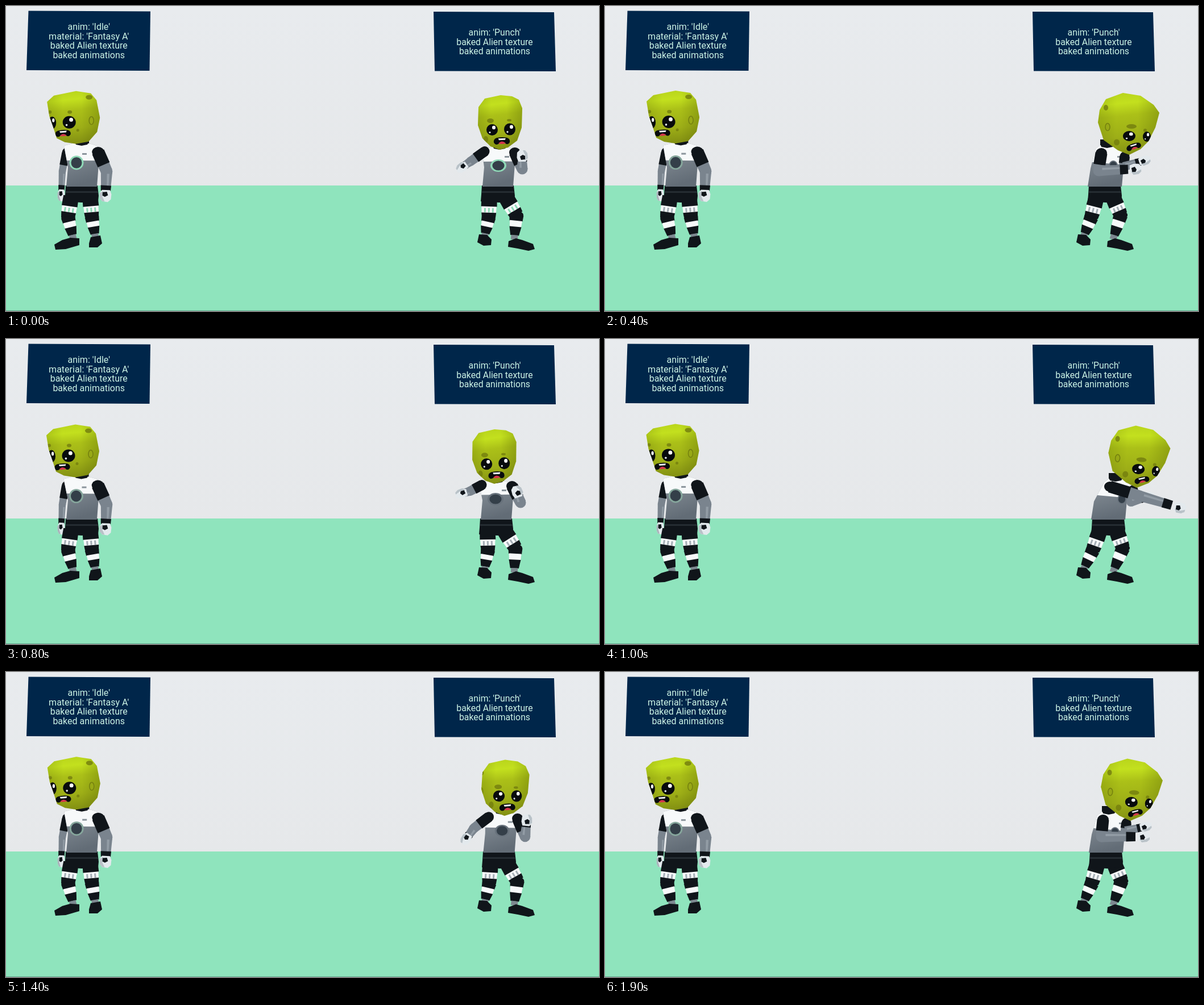
Recreate the animation shown at these times as an HTML page. Size 1043 px wide and 537 px high, loop 2000 ms.

```html
<!DOCTYPE html>
<html lang="en">
<head>
<meta charset="utf-8">
<title>Baked animations</title>
<style>
html, body { margin: 0; width: 100%; height: 100%; overflow: hidden; background: #e8ebee; }
svg { display: block; width: 1043px; height: 537px; }
text { font-family: Roboto, sans-serif; fill: #cdf3e6; text-anchor: middle; }
</style>
</head>
<body>
<svg viewBox="0 0 1043 537" xmlns="http://www.w3.org/2000/svg">
  <defs>
    <linearGradient id="skin" x1=".45" y1="0" x2=".55" y2="1">
      <stop offset="0" stop-color="#b9d51c"/>
      <stop offset=".16" stop-color="#c3e01e"/>
      <stop offset=".36" stop-color="#abc018"/>
      <stop offset=".7" stop-color="#9dae17"/>
      <stop offset="1" stop-color="#828f12"/>
    </linearGradient>
    <linearGradient id="shade">
      <stop offset="0" stop-color="#4d5a00" stop-opacity=".2"/>
      <stop offset=".3" stop-color="#4d5a00" stop-opacity="0"/>
      <stop offset=".65" stop-color="#4d5a00" stop-opacity="0"/>
      <stop offset="1" stop-color="#4d5a00" stop-opacity=".28"/>
    </linearGradient>
    <linearGradient id="shirt" x2=".25" y2="1">
      <stop offset="0" stop-color="#8d969e"/>
      <stop offset="1" stop-color="#626c76"/>
    </linearGradient>
    <linearGradient id="sky" x2="0" y2="1">
      <stop offset="0" stop-color="#e8ebee"/>
      <stop offset="1" stop-color="#e6e8ea"/>
    </linearGradient>
  </defs>
  <rect width="1043" height="317" fill="url(#sky)"/>
  <rect y="316" width="1043" height="221" fill="#8fe4bd"/>
  <rect y="536" width="1043" height="1" fill="#62a58b"/>
  <g fill="#00264a">
    <path d="M39.5 8.5L254 9.5L252.5 114L36 113Z"/>
    <path d="M752 10L964 11L967 115L754 114.500Z"/>
  </g>
  <g id="labels"></g>
  <g id="idle"></g>
  <g id="punch"></g>
</svg>
<script>
const $ = id => document.getElementById(id);
const INK = '#10151a', GREY = '#7a848e', WHITE = '#f7f9fa';

// Head outlines around the head centre, clockwise from the top
const FRONT = [1,-47, 21,-45, 33,-39, 39,-24, 38,10, 30,33, 14,45, -1,49, -17,43, -31,29, -39,6, -38,-26, -27,-41];
const TURNED = [-9,-54, 22,-49, 45,-33, 55,-19, 48,7, 36,31, 22,45, 2,55, -18,47, -43,29, -53,-2, -50,-24, -39,-43];
const LEFT = [4,-47, 30,-43, 40,-31, 46,0, 41,25, 26,42, 4,46, -16,43, -30,36, -36,17, -43,-3, -47,-28, -35,-39];

// x, y, rx, ry of: two eyes, mouth, ear, four spots
const FACE_FRONT = [-14,14,10,10, 17,13,10,10.5, 3,34,14,7, -44,8,3,6, -17,-2,6,4, -25,31,4,6, -42,-24,3,4, 16,-3,4,2];
const FACE_TURNED = [2,22,11,9, 33,23,7,9, 10,41,13,6, -36,6,4,6.5, 6,5,9,4, -20,33,5,5.5, -39,-28,4,5, 30,12,3,3];
const FACE_LEFT = [-38,9,7,11, -8,8,11.5,11, -19,28,13.5,6.5, 31,5,4,7, -7,-10,4,3, -42,-10,3,3, 27,-36,6,4, 7,22,2.5,2.5];

// Shoulders and sides of the torso: upper four values from the neck, the rest from the waist
const TORSO_FRONT = [-31,3, 27,3, 30,-40, 27,0, -27,0, -24,-34];
const TORSO_TURNED = [-20,4, 33,13, 33,-34, 30,0, -30,0, -25,-32];

const CYCLE = 760;
// time, turn, tilt, head, neck, waist x, near elbow, near hand, far elbow, far hand
const POSES = [
  [0, 0, 0, 869,204, 868,250, 865, 818,273, 802,284, 908,287, 908,264],
  [40, 0, -1, 859,206, 863,251, 862, 816,268, 801,272, 905,288, 899,269],
  [180, .9, -3, 911,205, 882,248, 876, 915,272, 971,286, 915,285, 930,275],
  [240, 1, 5, 938,207, 898,248, 885, 940,276, 1011,297, 925,287, 955,278],
  [290, 1, 5, 937,207, 896,248, 884, 932,278, 1007,296, 923,286, 955,277],
  [380, 1, 3, 925,207, 886,248, 881, 873,290, 948,290, 915,280, 951,272],
  [400, 1, 0, 920,207, 883,247, 879, 868,290, 933,287, 912,283, 949,272],
  [640, .2, 1, 878,203, 872,248, 867, 823,275, 809,294, 913,290, 916,261]
];
POSES.push([CYCLE, ...POSES[0].slice(1)]);

const mix = (a, b, k) => a + (b - a) * k;
const blend = (a, b, k) => a.map((v, i) => mix(v, b[i], k));
const fix = v => v.toFixed(1);
const poly = (pts, fill, extra = '') =>
  `<polygon points="${pts.map(p => Array.isArray(p) ? p.map(fix).join() : fix(p)).join(' ')}" fill="${fill}" ${extra}/>`;
const oval = (x, y, rx, ry, fill, extra = '') =>
  `<ellipse cx="${fix(x)}" cy="${fix(y)}" rx="${fix(rx)}" ry="${fix(ry)}" fill="${fill}" ${extra}/>`;

// A tapered band on the bone a-b between fractions k0 and k1
function band(a, b, k0, k1, w0, w1, fill, shift = 0) {
  const dx = b[0] - a[0], dy = b[1] - a[1], len = Math.hypot(dx, dy) || 1;
  const nx = -dy / len, ny = dx / len;
  const at = (k, off) => [a[0] + dx * k + nx * off, a[1] + dy * k + ny * off];
  return poly([at(k0, shift - w0 / 2), at(k0, shift + w0 / 2),
               at(k1, shift + w1 / 2), at(k1, shift - w1 / 2)], fill);
}

function leg(hip, knee, ankle, pale) {
  return band(hip, knee, .3, .82, 27, 25, WHITE) +
    [-7, 0, 7].map(s => band(hip, knee, .52, .75, 3, 3, pale, s)).join('') +
    oval(...knee, 12, 7, INK) +
    band(hip, knee, .76, 1, 26, 24, INK) +
    band(knee, ankle, 0, .26, 25, 23, INK) +
    band(knee, ankle, .24, .52, 22, 20, WHITE) +
    band(knee, ankle, .5, .87, 21, 15, INK) +
    band(knee, ankle, .86, 1.05, 12, 12, '#7d8890') +
    band(hip, knee, -.1, .44, 27, 28, INK);
}

function arm(s, e, h, size, tint) {
  const turn = Math.atan2(h[1] - e[1], h[0] - e[0]) * 180 / Math.PI;
  return oval(...s, 10 * size, 9, INK) +
    band(s, e, .55, 1, 20 * size, 19 * size, GREY) +
    oval(...e, 9.5 * size, 9.5 * size, GREY) +
    band(s, e, 0, .66, 21 * size, 21 * size, INK) +
    band(e, h, 0, .65, 19 * size, 16 * size, GREY) +
    band(e, h, .1, .6, 4 * size, 3 * size, '#929ca5', -3) +
    band(e, h, .58, .8, 17 * size, 16 * size, INK) +
    `<g transform="translate(${h.map(fix)}) rotate(${fix(turn)}) scale(1 ${size})">` +
    poly([-10,-7, -3,-9.5, 6,-9, 11,-4, 10,5, 5,9, -4,10, -10,6], '#e3e9ed') +
    poly([-8,4, 2,5, 10,1, 10,5, 5,9, -4,10], tint) +
    poly([-7,-2, -1,-4, 2,1, 0,5, -6,5], INK) + '</g>';
}

function head(id, [x, y], tilt, outline, f, mouthTilt) {
  const eye = i => {
    const [ex, ey, rx, ry] = f.slice(i, i + 4);
    return oval(ex, ey, rx, ry, '#080b0d') +
      oval(ex + rx * .3, ey - ry * .4, rx * .3, ry * .32, '#fff') +
      oval(ex - rx * .4, ey + ry * .45, rx * .16, ry * .16, '#dfe6ea');
  };
  const [mx, my, mw, mh] = f.slice(8, 12);
  const spots = [16, 20, 24, 28].map(i => oval(...f.slice(i, i + 4), '#76810f', 'opacity=".85"')).join('');
  return `<g transform="translate(${fix(x)} ${fix(y)}) rotate(${fix(tilt)})">
    <clipPath id="${id}">${poly(outline, '#000')}</clipPath>
    ${poly(outline, 'url(#skin)')}${poly(outline, 'url(#shade)')}
    <g clip-path="url(#${id})">${spots}
    ${oval(...f.slice(12, 16), '#98a916', 'stroke="#75810f" stroke-width="1.6"')}
    ${eye(0)}${eye(4)}
    <g transform="translate(${fix(mx)} ${fix(my)}) rotate(${fix(mouthTilt)}) scale(${mw / 14} ${mh / 7})">
      <path d="M-9 -6Q0 -8 9 -6Q15 -4 14 2Q11 8 5 4Q0 2 -5 4Q-11 8 -14 2Q-15 -4 -9 -6Z" fill="#080b0d"/>
      <path d="M-6 -5H7L6 -2H-5Z" fill="#eef2f3"/>
      <path d="M-6 4Q0 -3 7 4Q0 6 -6 4Z" fill="#d5344c"/>
    </g></g></g>`;
}

function torso([nx, ny], [px, py], shape, ring, ringFill) {
  const pts = [];
  for (let i = 0; i < 6; i++) {
    const top = i < 2;
    pts.push([shape[2 * i] + (top ? nx : px), shape[2 * i + 1] + (top ? ny : py)]);
  }
  const [ls, rs, rm, br, bl, lm] = pts;
  const collar = [[nx - 12, ny - 2], [nx + 13, ny - 1]];
  const hemL = blend(ls, lm, .68), hemR = blend(rs, rm, .82);
  return poly([[nx - 12, ny - 12], [nx + 13, ny - 12], [nx + 13, ny + 2], [nx, ny + 5], [nx - 12, ny + 1]], INK) +
    poly([ls, ...collar, rs, rm, br, bl, lm], 'url(#shirt)') +
    poly([ls, ...collar, rs, hemR, hemL], WHITE) +
    poly([[nx - 12, ny - 4], [nx + 13, ny - 4], [nx + 10, ny + 1], [nx, ny + 3], [nx - 10, ny + 1]], INK) +
    oval(nx + ring[0], ny + ring[1], ring[2], ring[3], ringFill) +
    oval(nx + ring[0], ny + ring[1], ring[2] * .76, ring[3] * .78, '#343f49');
}

function shorts([px, py], crotch) {
  return poly([[px - 28, py - 2], [px + 28, py - 2], [px + 30, py + 16], [px + 29, py + 26],
    [px + crotch, py + 28], [px - 30, py + 26], [px - 29, py + 14]], INK) +
    poly([[px - 28, py + 8], [px + 28, py + 8], [px + 29, py + 11], [px - 28, py + 11]], '#252c32');
}

const badge = (x, y) => `<rect x="${fix(x)}" y="${fix(y)}" width="8" height="3" fill="#8b959c"/>`;

function idle(t, pale) {
  const sway = Math.cos(2 * Math.PI * (t - 250) / 967);
  const neck = [133 + sway * .5, 243 - sway * .7], waist = [133, 318];
  const lift = -sway * .6;
  return arm([neck[0] - 28, neck[1] + 16], [99, 291 + lift], [97, 333 + lift], .65, '#a9b3ba') +
    leg([114, 338], [109, 371], [118, 408], pale) +
    leg([148, 338], [151, 371], [157, 406], pale) +
    poly([113,408, 129,409, 129,421, 105,428, 87,429, 85,420, 99,412], INK) +
    poly([149,407, 166,404, 169,418, 161,425, 146,425, 146,418], INK) +
    shorts(waist, 0) +
    torso(neck, waist, TORSO_FRONT, [-9, 33, 12.5, 12.5], pale === GREEN ? GREEN : '#86a69c') +
    badge(neck[0] + 1, neck[1] + 16) +
    arm([neck[0] + 29, neck[1] + 14], [177, 291 + lift], [175, 334 + lift], 1.08, '#b9c2c8') +
    head('clipA', [119.3 + sway * 1.4, 196.6 - sway], 0, LEFT, FACE_LEFT, -4);
}

function poseAt(ms) {
  const p = ms % CYCLE, i = POSES.findIndex(q => q[0] > p), a = POSES[i - 1], b = POSES[i];
  return blend(a, b, (p - a[0]) / (b[0] - a[0]));
}

function punch(t, pale) {
  const [, w, tilt, hx, hy, nx, ny, px, ...arms] = poseAt(t);
  const [nearE, nearH, farE, farH] = [0, 2, 4, 6].map(i => arms.slice(i, i + 2));
  const neck = [nx, ny], waist = [px, 318], move = px - 865;
  const ring = blend([-2, 31, 14, 11], [11, 34, 8, 9], w);
  return leg([px - 15, 338], [849 + move * .45, 372], [842, 405], pale) +
    leg([px + 15, 338], [898 + move * .65, 368], [894, 409], pale) +
    poly([832,402, 846,403, 854,411, 853,421, 840,422, 829,416], INK) +
    poly([884,414, 897,409, 908,412, 927,419, 930,428, 919,431, 900,427, 883,424], INK) +
    shorts(waist, 2) +
    torso(neck, waist, blend(TORSO_FRONT, TORSO_TURNED, w), ring, pale === GREEN ? GREEN : '#68727c') +
    badge(nx + mix(9, 18, w), ny + mix(14, 17, w)) +
    arm([nx + mix(27, 31, w), ny + mix(8, 18, w)], farE, farH, mix(1, .85, w), '#b9c2c8') +
    arm([nx + mix(-26, -10, w), ny + mix(6, 12, w)], nearE, nearH, mix(.85, 1, w), '#b9c2c8') +
    head('clipB', [hx, hy], tilt, blend(FRONT, TURNED, w), blend(FACE_FRONT, FACE_TURNED, w), mix(-2, -18, w));
}

const GREEN = '#8fd9b7', SILVER = '#a5aeb6';

function label(lines, x, y, size, step) {
  return lines.map((s, i) => `<text x="${x}" y="${y + i * step}" font-size="${size}">${s}</text>`).join('');
}
const shared = ['baked Alien texture', 'baked animations'];
$('labels').innerHTML =
  label(["anim: 'Idle'", "material: 'Fantasy A'", ...shared], 145.7, 42.3, 16, 16.4) +
  label(["anim: 'Punch'", ...shared], 859.5, 52.3, 15.8, 16.2);

let last = -1;
function draw(now) {
  const t = Math.floor(now % 2000 / 100) * 100;
  if (t !== last) {
    last = t;
    const pale = t < 100 ? GREEN : SILVER;
    $('idle').innerHTML = idle(t, pale);
    $('punch').innerHTML = punch(t, pale);
  }
  requestAnimationFrame(draw);
}
draw(performance.now());
</script>
</body>
</html>
```
